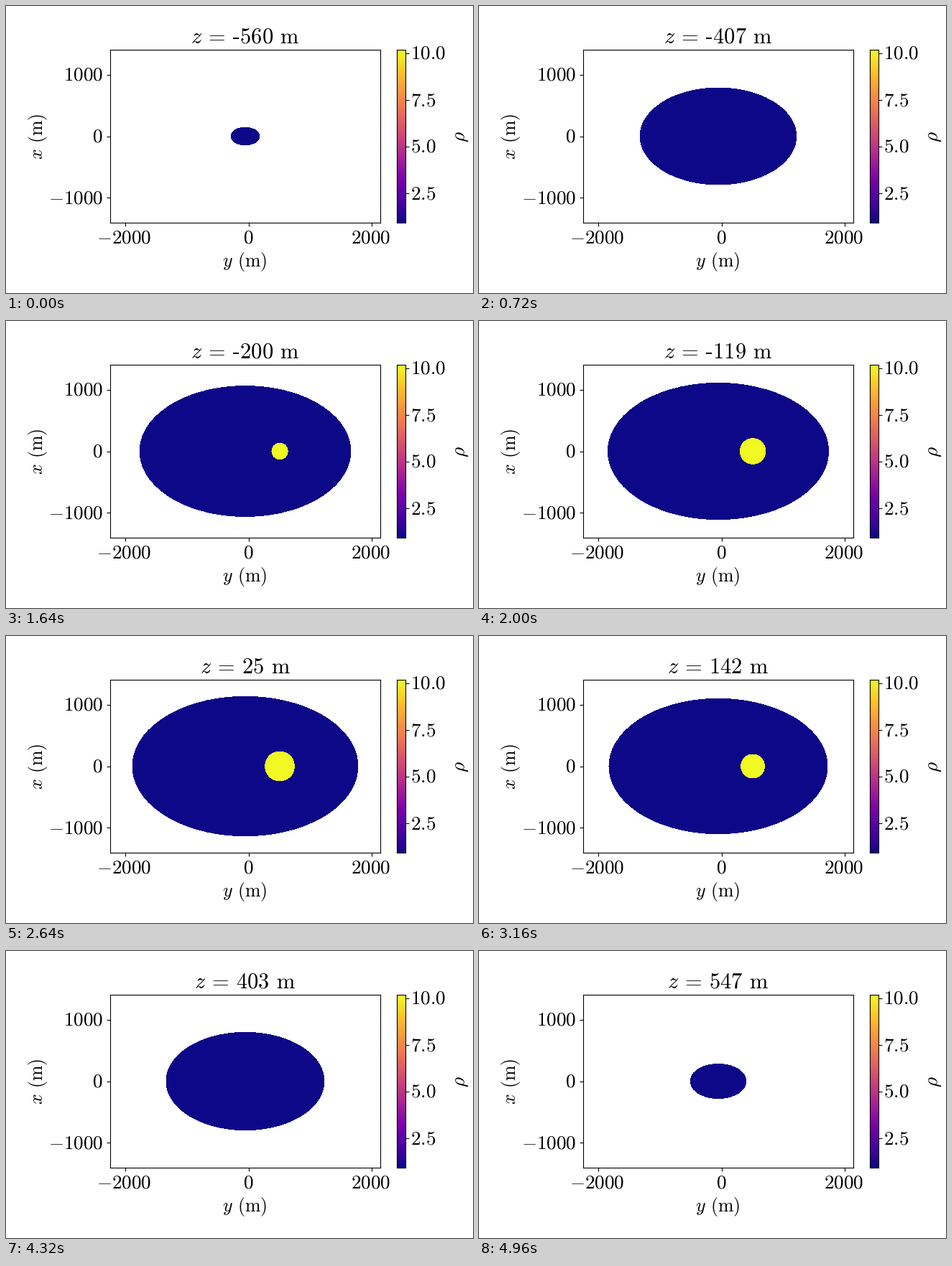
Recreate the animation shown at these times as a matplotlib script. Size 650 by 400 pixels, loop 5000 ms.

```python
import numpy as np
import matplotlib.pyplot as plt
from matplotlib.animation import FuncAnimation
from matplotlib.patches import Ellipse, Rectangle

plt.rcParams["mathtext.fontset"] = "cm"

W, H, DPI = 650, 400, 100
FRAMES, INTERVAL = 125, 40
Z_START, Z_STEP = -560, 9

# Semi-axes and centre of the body, radius and centre of the dense core (m)
A, B, C, Y_BODY = 1828, 1133, 564.5, -53
R_CORE, Y_CORE = 238, 507
RHO_BODY, RHO_CORE = 0.92, 10.18

TITLE_SIZE, TICK_SIZE, LABEL_SIZE = 22, 19.6, 18.6
TITLE_X, TITLE_Y = 332, 51.5
EM = TITLE_SIZE * DPI / 72
SPACE = r"\hspace{0.38}"

fig = plt.figure(figsize=(W / DPI, H / DPI), dpi=DPI, facecolor="white")
cmap = plt.get_cmap("plasma")


def pixel_axes(left, top, right, bottom):
    return fig.add_axes([left / W, 1 - bottom / H,
                         (right - left) / W, (bottom - top) / H])


# Overlay in pixel coordinates for all text
stage = pixel_axes(0, 0, W, H)
stage.set(xlim=(0, W), ylim=(H, 0))
stage.axis("off")


def label(x, y, text, size=TICK_SIZE, ha="center", rotation=0):
    stage.text(x, y, f"${text}$", size=size, ha=ha, va="center",
               rotation=rotation)


ax = pixel_axes(145, 61, 521, 302)
ax.set(xlim=(-2241, 2136), ylim=(-1403, 1403),
       xticks=[-2000, 0, 2000], yticks=[-1000, 0, 1000])
ax.tick_params(labelbottom=False, labelleft=False)

bar = pixel_axes(544, 61, 556, 302)
bar.imshow(np.linspace(0, 1, 256)[:, None], cmap=cmap, origin="lower",
           aspect="auto", extent=(0, 1, RHO_BODY, RHO_CORE))
bar.set(xticks=[], yticks=[2.5, 5, 7.5, 10])
bar.yaxis.tick_right()
bar.tick_params(labelright=False)

for x, text in [(164, "-2000"), (337, "0"), (508, "2000")]:
    label(x, 323.5, text)
for y, text in [(97, "1000"), (182.5, "0"), (269, "-1000")]:
    label(135, y, text, ha="right")
for y, text in [(67, "10.0"), (132, "7.5"), (197, "5.0"), (262, "2.5")]:
    label(563, y, text, ha="left")
label(332, 357, rf"y{SPACE}(\mathrm{{m}})", LABEL_SIZE)
label(45, 181.5, rf"x{SPACE}(\mathrm{{m}})", LABEL_SIZE, rotation=90)
label(633, 182, r"\rho", rotation=90)

body = Ellipse((Y_BODY, 0), 0, 0, color=cmap(0.0), lw=0, antialiased=False)
core = Ellipse((Y_CORE, 0), 0, 0, color=cmap(1.0), lw=0, antialiased=False)
ax.add_patch(body)
ax.add_patch(core)

title = stage.text(0, TITLE_Y, "", size=TITLE_SIZE, ha="left", va="baseline")
hyphen = Rectangle((0, TITLE_Y - 0.245 * EM), 0.265 * EM, 0.06 * EM,
                   color="black", lw=0)
stage.add_patch(hyphen)


def set_title(z):
    digits = str(abs(z))
    lead = 1.92
    width = lead + 0.333 * (z < 0) + 0.5 * len(digits) + 0.333 + 0.833
    x0 = TITLE_X - width * EM / 2
    gap = SPACE if z < 0 else ""
    title.set_x(x0)
    title.set_text(rf"$z\hspace{{0.18}}=\hspace{{0.18}}{gap}{digits}"
                   rf"{SPACE}\mathrm{{m}}$")
    hyphen.set_x(x0 + (lead + 0.011) * EM)
    hyphen.set_visible(z < 0)


def update(i):
    # The first slice is held for two ticks
    z = Z_START + Z_STEP * max(i - 1, 0)
    scale = np.sqrt(1 - (z / C) ** 2)
    body.set(width=2 * A * scale, height=2 * B * scale)
    size = 2 * np.sqrt(max(R_CORE ** 2 - z ** 2, 0))
    core.set(width=size, height=size, visible=size > 0)
    set_title(z)
    return body, core, title, hyphen


anim = FuncAnimation(fig, update, frames=FRAMES, interval=INTERVAL,
                     repeat=True, repeat_delay=0, blit=False)
plt.show()
```
